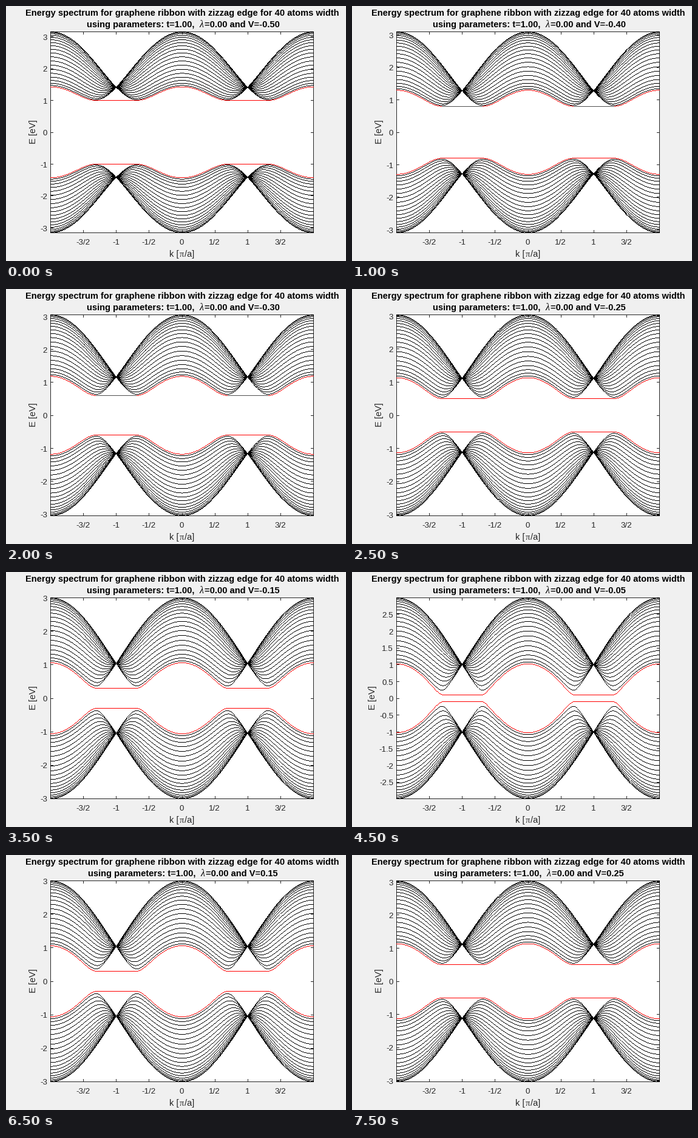
Recreate the animation shown at these times as a matplotlib script. Size 560 by 420 pixels, loop 8 s.

```python
import numpy as np
import matplotlib.pyplot as plt
from matplotlib.animation import FuncAnimation
from matplotlib.collections import LineCollection

W, H, DPI = 560, 420, 80
PX = 72 / DPI                                   # points per pixel
LEFT, RIGHT, TOP, BOTTOM = 73.5, 506.5, 42.5, 373.5
MID, HALF = (TOP + BOTTOM) / 2, (BOTTOM - TOP) / 2
COL0, ROW0 = int(LEFT), int(TOP)
COLS, ROWS = int(RIGHT) - COL0 + 1, int(BOTTOM) - ROW0 + 1
INK = (0.15, 0.15, 0.15)
BLACK, RED, GREY = (0, 0, 0, 255), (255, 0, 0, 255), (80, 80, 80, 255)
TICK = 4.5
SMALL, BIG = 13.333, 14.667                     # font sizes in pixels
FRAMES, STEP_MS = 16, 500
SUB = 8                                         # curve samples per pixel

plt.rcParams["font.family"] = "Liberation Sans"
fig = plt.figure(figsize=(W / DPI, H / DPI), dpi=DPI, facecolor="#f0f0f0")
ax = fig.add_axes([0, 0, 1, 1])
ax.axis("off")


def text(x, y, s, size=SMALL, color=INK, ha="center", **kw):
    return ax.text(x, y, s, fontsize=size * PX, color=color, ha=ha,
                   va="baseline", **kw)


def to_x(k):
    return LEFT + (k + 2) / 4 * (RIGHT - LEFT)


def centre(p):
    return np.floor(p) + 0.5


def ribbon(k, rows=20):
    """Positive hopping energies of a zigzag ribbon, largest first."""
    m = np.zeros((len(k), rows, rows))
    i = np.arange(rows)
    m[:, i, i] = 2 * np.cos(np.pi * k / 2)[:, None]
    m[:, i[1:], i[:-1]] = 1
    return np.linalg.svd(m, compute_uv=False).T


k = np.linspace(-2, 2, (COLS - 1) * SUB + 1)
eps = ribbon(k)
flat = np.abs(np.abs(k) - 1) < 0.31
sample = np.arange(len(k))
column = sample // SUB
on_column = sample % SUB == 0


def trace(img, ys, color, keep=True):
    """Draw curves one hard-edged pixel wide."""
    ys = np.atleast_2d(ys)
    steep = np.abs(np.gradient(ys, axis=1)) * SUB > 1
    row = np.floor(ys - 0.5)
    on_row = np.diff(row, axis=1, prepend=row[:, :1]) != 0
    hit = np.where(steep, on_row, on_column) & keep
    r = np.clip(np.floor(ys[hit]).astype(int) - ROW0, 0, ROWS - 1)
    img[r, np.broadcast_to(column, ys.shape)[hit]] = color


# Plot area
frame = ((LEFT, TOP), RIGHT - LEFT, BOTTOM - TOP)
ax.add_patch(plt.Rectangle(*frame, fc="white", ec="none", zorder=0))
ax.add_patch(plt.Rectangle(*frame, fc="none", ec=INK, lw=PX, snap=False,
                           joinstyle="miter", zorder=2))
curves = ax.imshow(np.zeros((ROWS, COLS, 4), np.uint8), aspect="auto",
                   extent=(COL0, COL0 + COLS, ROW0 + ROWS, ROW0),
                   interpolation="nearest", zorder=3)
ax.set_xlim(0, W)
ax.set_ylim(H, 0)

# Horizontal axis
names = ["-3/2", "-1", "-1/2", "0", "1/2", "1", "3/2"]
for n, name in enumerate(names):
    x = to_x(-1.5 + n / 2)
    text(x - 0.5, 393, name)
    for y, d in ((TOP, TICK), (BOTTOM, -TICK)):
        ax.plot([centre(x)] * 2, [y, y + d], color=INK, lw=PX, snap=False,
                solid_capstyle="butt", zorder=1)
text(269, 413, "k [", BIG, ha="left")
text(289.5, 413, "\u03c0", BIG, family="Liberation Serif")
text(294.5, 413, "/a]", BIG, ha="left")

# Title
bold = dict(size=BIG, color="black", weight="bold")
text(290, 16, "Energy spectrum for graphene ribbon with zizzag edge "
              "for 40 atoms width", **bold)
head = text(0, 35, "using parameters: t=1.00,", ha="left", **bold)
lam = text(0, 35, "\u03bb", 16, "black", family="Liberation Serif",
           style="italic")
tail = text(0, 35, "", ha="left", **bold)

# Vertical axis, rescaled at every step
ylabel = text(0, MID - 1, "E [eV]", BIG, rotation=90, rotation_mode="anchor")
ylabels = [text(68, 0, "", ha="right") for _ in range(13)]
yticks = LineCollection([], colors=[INK], linewidths=PX, snap=False, zorder=1)
ax.add_collection(yticks)


def draw(i):
    v = (i - 10) / 20
    energy = np.sqrt(eps ** 2 + 4 * v * v)
    peak = energy.max()
    scale = HALF / peak
    bulk, edge = energy[:-1] * scale, energy[-1] * scale

    img = np.zeros((ROWS, COLS, 4), np.uint8)
    for side in (-1, 1):
        trace(img, MID + side * bulk, BLACK)
        trace(img, MID + side * edge, RED)
    if 2 <= i <= 4:
        trace(img, MID - edge, GREY, flat)
    curves.set_data(img)

    fine = peak < 3
    step = 0.5 if fine else 1
    count = int(peak / step)
    values = np.arange(-count, count + 1) * step
    segs = []
    for n, label in enumerate(ylabels):
        label.set_visible(n < len(values))
        if n < len(values):
            y = MID - values[n] * scale
            label.set_text(f"{values[n]:g}")
            label.set_y(y + 5.3)
            y = centre(y)
            segs += [[(LEFT, y), (LEFT + TICK, y)],
                     [(RIGHT - TICK, y), (RIGHT, y)]]
    yticks.set_segments(segs)
    ylabel.set_x(38 if fine else 48.5)

    shift = 0 if v < 0 else 2.4
    head.set_x(133 + shift)
    lam.set_x(321.5 + shift)
    tail.set_x(327 + shift)
    tail.set_text(f"=0.00 and V={v:.2f}")
    return []


anim = FuncAnimation(fig, draw, frames=FRAMES, interval=STEP_MS,
                     init_func=lambda: [], repeat=True, repeat_delay=0)
draw(0)
plt.show()
```
